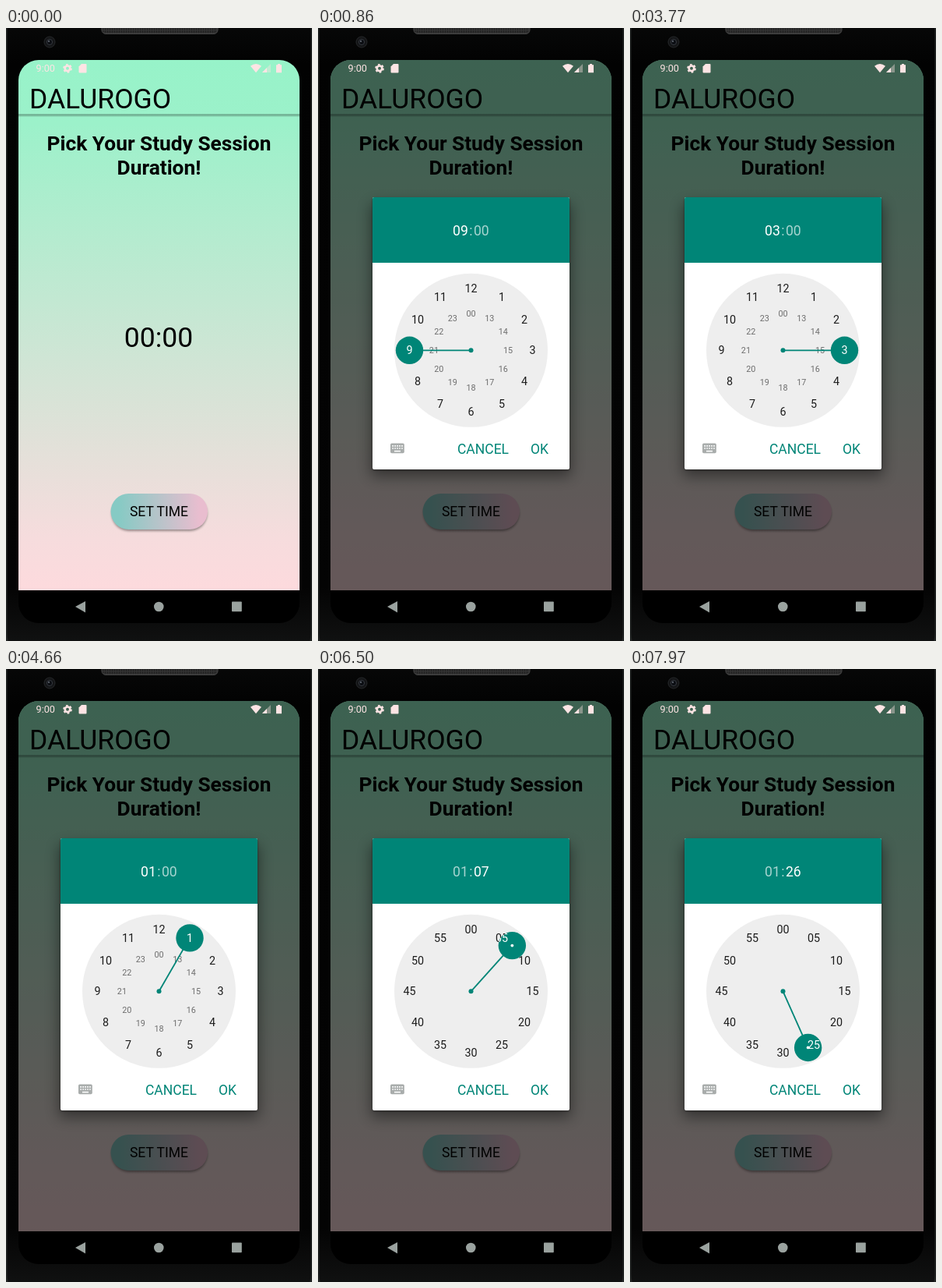
An HTML page for the animation above (8000 ms loop, 393 px wide and 786 px high).

```html
<!DOCTYPE html>
<html lang="en">
<head>
<meta charset="utf-8">
<title>Study timer</title>
<style>
  html, body { margin: 0; width: 100%; height: 100%; overflow: hidden; background: #000; }
  svg { display: block; width: 100%; height: 100%; font-family: Roboto, sans-serif; }
  .mid { text-anchor: middle; }
</style>
</head>
<body>
<svg viewBox="0 0 393 786">
  <defs>
    <linearGradient id="body" x2="0" y2="1">
      <stop offset="0" stop-color="#0b0c0c"/>
      <stop offset=".1" stop-color="#020202"/>
      <stop offset=".88" stop-color="#040404"/>
      <stop offset="1" stop-color="#161717"/>
    </linearGradient>
    <linearGradient id="page" x2="0" y2="1">
      <stop offset="0" stop-color="#97f3c9"/>
      <stop offset=".12" stop-color="#9cf1ca"/>
      <stop offset=".9" stop-color="#f6dcdd"/>
      <stop offset="1" stop-color="#fddadd"/>
    </linearGradient>
    <linearGradient id="pill">
      <stop offset=".08" stop-color="#86cac4"/>
      <stop offset=".92" stop-color="#e9bdcf"/>
    </linearGradient>
    <linearGradient id="barShade" x2="0" y2="1">
      <stop offset="0" stop-color="#000" stop-opacity=".38"/>
      <stop offset="1" stop-color="#000" stop-opacity="0"/>
    </linearGradient>
    <pattern id="mesh" width="3" height="3" patternUnits="userSpaceOnUse">
      <rect width="3" height="3" fill="#333"/>
      <circle cx="1.5" cy="1.5" r=".9" fill="#1c1c1c"/>
    </pattern>
    <filter id="blurS" x="-20%" y="-40%" width="140%" height="180%"><feGaussianBlur stdDeviation="1.4"/></filter>
    <filter id="blurL" x="-20%" y="-20%" width="140%" height="140%"><feGaussianBlur stdDeviation="9"/></filter>
    <clipPath id="screen"><path d="M16 721V67a26 26 0 0 1 26-26H351a26 26 0 0 1 26 26V721z"/></clipPath>
    <clipPath id="knobClip"><circle id="knobHole" r="17.7"/></clipPath>
  </defs>

  <!-- phone -->
  <rect width="393" height="786" fill="#232625"/>
  <rect x="1.5" y="-40" width="390" height="860" rx="44" fill="url(#body)"/>
  <rect x="123" y="-8" width="149" height="15.5" rx="5" fill="url(#mesh)" stroke="#4a4a4a"/>
  <circle cx="56" cy="18" r="7" fill="#141517" stroke="#26282a"/>
  <circle cx="56" cy="18" r="3.6" fill="#0b0d12" stroke="#34383e"/>
  <circle cx="55" cy="17" r="1.2" fill="#555b64"/>
  <path d="M16 721H377V737a26 26 0 0 1-26 26H42a26 26 0 0 1-26-26z" fill="#000"/>
  <g fill="#9aa29f">
    <path d="M89 742L102 735V749.500z"/>
    <circle cx="196.300" cy="742" r="6.300"/>
    <rect x="290" y="735.500" width="12.800" height="12.800" rx=".8"/>
  </g>

  <!-- page -->
  <g clip-path="url(#screen)">
    <rect x="16" y="41" width="361" height="680" fill="url(#page)"/>
    <rect x="16" y="110.500" width="361" height="4" fill="url(#barShade)"/>
    <text x="30" y="103" font-size="35.500">DALUROGO</text>
    <g class="mid" font-size="26.300" font-weight="700">
      <text x="196.500" y="157">Pick Your Study Session</text>
      <text x="196.500" y="187.500">Duration!</text>
    </g>
    <text class="mid" x="196" y="409" font-size="35.500">00:00</text>
    <rect x="135.500" y="600" width="123" height="45" rx="22.500" opacity=".38" filter="url(#blurS)"/>
    <rect x="134.500" y="597" width="124.500" height="46" rx="23" fill="url(#pill)"/>
    <rect id="press" x="134.500" y="597" width="124.500" height="46" rx="23"/>
    <text class="mid" x="196.500" y="626.300" font-size="17.500">SET TIME</text>
    <rect id="scrim" x="16" y="41" width="361" height="680"/>
  </g>

  <!-- status bar -->
  <g fill="#fde4e4">
    <text x="38.500" y="56.300" font-size="12.700">9:00</text>
    <circle cx="79" cy="51.800" r="3.300" fill="none" stroke="#fde4e4" stroke-width="2.700"/>
    <circle cx="79" cy="51.800" r="5" fill="none" stroke="#fde4e4" stroke-width="1.800" stroke-dasharray="2.600 2.636"/>
    <path d="M97 46H102.500a1 1 0 0 1 1 1V56.500a1 1 0 0 1-1 1H94.500a1 1 0 0 1-1-1V49.500z"/>
    <path d="M314 48.700Q321 43.300 328 48.700L321 57.300z"/>
    <path d="M340 46V57H329z" opacity=".4"/>
    <path d="M335 51V57H329z"/>
    <path d="M349 46h3v1.200h2V57.300h-7V47.200h2z"/>
  </g>

  <!-- time dialog -->
  <g id="dialog">
    <rect x="68" y="226" width="257" height="349" rx="4" opacity=".42" filter="url(#blurL)"/>
    <rect x="70" y="219" width="253" height="348" rx="2" opacity=".4" filter="url(#blurS)"/>
    <rect x="70" y="217" width="253" height="349" rx="2" fill="#fff"/>
    <path d="M70 301V219a2 2 0 0 1 2-2H321a2 2 0 0 1 2 2V301z" fill="#008577"/>
    <g font-size="17.600" fill="#fff">
      <text id="hourText" x="192.800" y="266" text-anchor="end"></text>
      <text class="mid" x="196.300" y="265.500" opacity=".65">:</text>
      <text id="minuteText" x="199.900" y="266"></text>
    </g>
    <circle cx="196.500" cy="413.300" r="98.500" fill="#eee"/>
    <g id="darkNums" class="mid"></g>
    <g fill="#008577">
      <line id="hand" x1="196.500" y1="413.300" stroke="#008577" stroke-width="1.800"/>
      <circle cx="196.500" cy="413.300" r="3"/>
      <circle id="knob" r="17.700"/>
    </g>
    <g id="lightNums" class="mid" clip-path="url(#knobClip)"></g>
    <circle id="dot" r="1.900" fill="#fff"/>
    <rect x="93" y="532.500" width="17.800" height="12.800" rx="1.800" fill="#a9adac"/>
    <path d="M95.300 535.800H109M95.300 539H109" stroke="#fff" stroke-width="1.700" stroke-dasharray="1.700 1.250"/>
    <path d="M98 542.600H106" stroke="#fff" stroke-width="1.600"/>
    <g class="mid" font-size="17.500" fill="#008577">
      <text x="212" y="545.800">CANCEL</text>
      <text x="284.500" y="545.800">OK</text>
    </g>
  </g>
</svg>
<script>
const NS = 'http://www.w3.org/2000/svg';
const LOOP = 8000, STEP = 70;
const CX = 196.5, CY = 413.3, OUTER = 79, INNER = 47.6;
const $ = id => document.getElementById(id);
const clamp = x => Math.min(1, Math.max(0, x));
const pad = n => String(n).padStart(2, '0');
const set = (el, attrs) => { for (const k in attrs) el.setAttribute(k, attrs[k]); };

function polar(deg, r) {
  const a = deg * Math.PI / 180;
  return [CX + r * Math.sin(a), CY - r * Math.cos(a)];
}

function make(parent, tag, attrs) {
  const el = document.createElementNS(NS, tag);
  set(el, attrs);
  return parent.appendChild(el);
}

function ring(parent, label, r, size, fill) {
  for (let i = 0; i < 12; i++) {
    const [x, y] = polar(i * 30, r);
    make(parent, 'text', { x, y: y + size * 0.355, 'font-size': size, fill }).textContent = label(i);
  }
}

function dial(parent, dark, soft) {
  const hours = make(parent, 'g', {}), minutes = make(parent, 'g', {});
  ring(hours, i => i || 12, OUTER, 14.3, dark);
  ring(hours, i => i ? i + 12 : '00', INNER, 10.8, soft);
  ring(minutes, i => pad(i * 5), OUTER, 14.3, dark);
  return { hours, minutes };
}

const dials = [dial($('darkNums'), '#1c1c1c', '#6d6d6d'), dial($('lightNums'), '#fff', '#fff')];

// Rows: start time, scrim, dialog opacity, dialog scale, button press
const opening = [
  [0, 0, 0, 1, 0], [500, 0.02, 0, 1, 0.06], [570, 0.06, 0.1, 0.95, 0.1],
  [640, 0.15, 0.45, 0.98, 0.1], [710, 0.28, 0.82, 0.995, 0.08],
  [780, 0.42, 0.97, 1, 0.05], [860, 0.595, 1, 1, 0]
];
const hourSteps = [[0, 9], [2180, 8], [2420, 7], [2920, 6], [3130, 5], [3340, 4], [3550, 3], [3830, 2], [4040, 1]];

const current = (rows, t) => rows.filter(row => row[0] <= t).pop();
const held = (t, start) => start + Math.floor((t - start) / STEP + 1e-6) * STEP;

function minuteAt(t) {
  if (t < 6500) return 0;
  if (t < 7340) return Math.round(7 + 13 * clamp((held(t, 6500) - 6500) / 770));
  return Math.round(20 + 6 * clamp((held(t, 7340) - 7270) / 700));
}

function draw(t) {
  const [, dim, alpha, scale, press] = current(opening, t);
  set($('scrim'), { opacity: dim });
  set($('press'), { opacity: press });
  set($('dialog'), {
    opacity: alpha,
    transform: `translate(196.5 391.5) scale(${scale}) translate(-196.5 -391.5)`
  });

  const hour = current(hourSteps, t)[1], minute = minuteAt(t);
  const picking = t >= 4730;
  $('hourText').textContent = pad(hour);
  $('minuteText').textContent = pad(minute);
  set($('hourText'), { opacity: picking ? 0.65 : 1 });
  set($('minuteText'), { opacity: picking ? 1 : 0.65 });

  // The selector swings from the hour to the minute while the rings cross-fade
  const p = picking ? clamp((held(t, 4660) - 4700) / 540) : 0;
  const mix = (1 - Math.cos(Math.PI * p)) / 2;
  for (const d of dials) {
    set(d.hours, { opacity: 1 - mix });
    set(d.minutes, { opacity: mix });
  }
  const [x, y] = polar(hour * 30 * (1 - mix) + minute * 6 * mix, OUTER);
  for (const id of ['knob', 'knobHole', 'dot']) set($(id), { cx: x, cy: y });
  set($('hand'), { x2: x, y2: y });
  set($('dot'), { opacity: minute % 5 ? 1 : 0 });
}

const origin = performance.now();
function tick() {
  draw((performance.now() - origin) % LOOP);
  requestAnimationFrame(tick);
}
draw(0);
requestAnimationFrame(tick);
</script>
</body>
</html>
```
